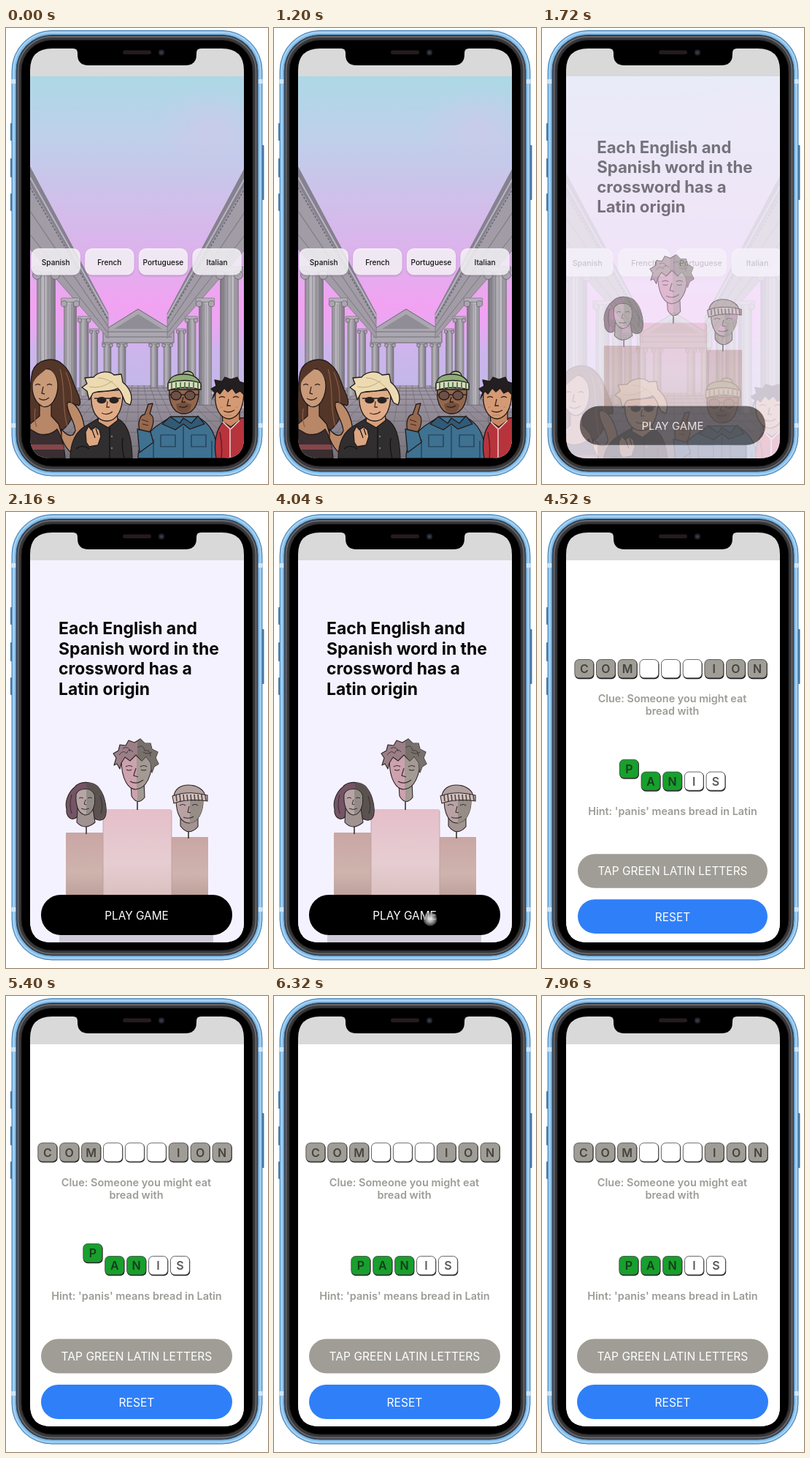
Write an HTML page that moves like this. It is 359 px wide and 623 px high and loops after 8000 ms.

```html
<!DOCTYPE html>
<html lang="en">
<head>
<meta charset="utf-8">
<title>Latin word game</title>
<style>
html, body { margin: 0; width: 100%; height: 100%; overflow: hidden; background: #fff; }
svg { display: block; width: 359px; height: 623px; }
text { font-family: Inter, Roboto, sans-serif; }
</style>
</head>
<body>
<svg id="stage" viewBox="0 0 359 623" xmlns="http://www.w3.org/2000/svg"></svg>
<script>
const LOOP = 8000;
const stage = document.getElementById('stage');

// Markup helpers
const rect = (x, y, w, h, r, fill, more = '') =>
  `<rect x="${x}" y="${y}" width="${w}" height="${h}" rx="${r}" fill="${fill}" ${more}/>`;
const path = (d, fill, more = '') => `<path d="${d}" fill="${fill}" ${more}/>`;
const line = (d, color, w = 1, more = '') =>
  `<path d="${d}" fill="none" stroke="${color}" stroke-width="${w}" ${more}/>`;
const oval = (x, y, rx, ry, fill, more = '') =>
  `<ellipse cx="${x}" cy="${y}" rx="${rx}" ry="${ry}" fill="${fill}" ${more}/>`;
const text = (s, x, y, size, fill, weight = 400, anchor = 'middle') =>
  `<text x="${x}" y="${y}" font-size="${size}" fill="${fill}" font-weight="${weight}" text-anchor="${anchor}">${s}</text>`;
const gradient = (id, ...stops) =>
  `<linearGradient id="${id}" x1="0" y1="0" x2="0" y2="1">` +
  stops.map(([at, c]) => `<stop offset="${at}" stop-color="${c}"/>`).join('') + '</linearGradient>';

const defs = `<defs>
  <clipPath id="screen"><path d="M33 66H326V560Q326 588 298 588H62Q33 588 33 558Z"/></clipPath>
  ${gradient('sky', [0, '#add8e6'], [.16, '#bed0ea'], [.32, '#cfc0ea'], [.48, '#deb0ec'], [.6, '#f2a2f2'],
    [.65, '#eaa6f1'], [.72, '#ccb5ec'], [.82, '#c2b8e8'])}
  ${gradient('floor', [0, '#a39ba9'], [1, '#77727a'])}
  ${gradient('pink', [0, '#e5bfc9'], [.6, '#e6cdd2'], [1, '#d9bfbd'])}
  ${gradient('tan', [0, '#c9a6a4'], [.6, '#cfb3ad'], [1, '#bb9f98'])}
  <linearGradient id="shaft"><stop offset="0" stop-color="#8b8890"/><stop offset=".35" stop-color="#c0bdc4"/>
    <stop offset="1" stop-color="#77737c"/></linearGradient>
  <linearGradient id="split"><stop offset=".5" stop-color="#cda2ae"/><stop offset=".5" stop-color="#a39a94"/></linearGradient>
  <radialGradient id="tap"><stop offset="0" stop-color="#fff"/><stop offset=".5" stop-color="#b5b5b5"/>
    <stop offset="1" stop-color="#777" stop-opacity=".55"/></radialGradient>
  <radialGradient id="cloud"><stop offset="0" stop-color="#dcc2ea"/><stop offset="1" stop-color="#dcc2ea" stop-opacity="0"/></radialGradient>
  <filter id="soft"><feGaussianBlur stdDeviation="1.2"/></filter>
</defs>`;

// Temple
function column(cx, w, top, foot) {
  const x = cx - w / 2, c = w * .24;
  let s = rect(x, top + c, w, foot - top - c, 0, 'url(#shaft)', 'stroke="#68646c" stroke-width=".5"');
  for (let i = 1; i < 5; i++) s += line(`M${x + w * i / 5} ${top + c * 2}V${foot}`, '#7d7983', w / 36);
  s += rect(x - c, top, w + c * 2, c * 1.3, 1, '#b5b1b9', 'stroke="#68646c" stroke-width=".6"');
  for (const k of [-1, 1])
    s += oval(cx + k * w / 2, top + c * 1.9, c, c, '#aaa6ae', 'stroke="#5b5760" stroke-width=".7"');
  return s;
}

const colonnade =
  path('M33 190L140 390V424L33 302Z', '#a19ca6', 'stroke="#7b7681" stroke-width=".8"') +
  path('M33 190L140 390V398L33 214Z', '#85818f') +
  line('M33 204L140 394', '#b9b5c0', 2) +
  line('M33 218L140 399', '#6b6773', 1.6, 'stroke-dasharray="3 2"') +
  line('M33 250L140 408', '#817c86', 1.2) + line('M33 282L140 417', '#7a7580', 1) +
  [[121, 9, 411, 496], [107, 12, 394, 503], [88, 17, 369, 515], [55, 25, 326, 540]]
    .map(c => column(...c)).join('');

function floor() {
  let s = path('M33 520L110 488H252L326 520V588H33Z', 'url(#floor)');
  for (let y = 492, k = 4; y < 588; y += k, k *= 1.25) s += line(`M33 ${y}H326`, '#69656e', .8);
  for (let i = -9; i < 10; i++) s += line(`M${181 + i * 8} 488L${181 + i * 25} 588`, '#6e6973', .7);
  return s;
}

const temple = rect(30, 66, 300, 522, 0, 'url(#sky)') +
  oval(280, 135, 80, 55, 'url(#cloud)', 'opacity=".4"') + floor() +
  [139, 159, 203, 221].map(x => column(x, 10, 429, 491)).join('') +
  path('M133 414L181 384L230 414V430H133Z', '#aba7b0', 'stroke="#6a6670"') +
  path('M148 411L181 391L214 411Z', '#918d97') +
  line('M133 415H230M136 422H227', '#726e78') +
  colonnade + `<g transform="translate(361 0) scale(-1 1)">${colonnade}</g>`;

// People in front of the temple
const ink = 'stroke="#211a1a" stroke-width="1.3" stroke-linejoin="round"';

const woman =
  path('M35 565C33 530 30 500 36 470C42 452 66 448 78 460C88 468 90 480 96 494C104 510 103 520 96 514C93 530 84 550 70 552Z', '#543629', ink) +
  path('M46 510V530L33 541V560H78L72 541L62 530V508Z', '#b88767', ink) +
  path('M33 588V548L40 552C48 558 62 556 70 548C78 560 80 574 81 588Z', '#3a2e30', ink) +
  path('M33 569H78L80 576H33Z', '#84464a') +
  path('M76 548C84 558 92 560 95 550C94 536 82 524 84 512C92 508 102 522 106 538C110 554 106 580 94 582C86 580 80 570 76 560Z', '#bd8a68', ink) +
  path('M36 486C37 470 48 464 59 466C69 470 73 484 70 498C67 512 58 520 50 517C40 512 35 500 36 486Z', '#c99a78', ink) +
  path('M36 490C38 476 50 472 58 463C66 472 72 478 73 492C80 474 72 456 56 457C42 458 34 474 36 490Z', '#543629') +
  line('M40 488q4 -3 7 0M56 488q4 -3 7 0M51 490l-2 9 4 1M45 506q7 5 14 -1', '#3b2724', 1.3) +
  line('M74 466C82 490 76 520 84 544M82 470C90 490 90 500 90 514M40 520Q38 535 42 545', '#8a5c42', 1.2);

const blond =
  path('M88 588C88 565 96 550 112 542L127 533H152C166 540 172 555 173 588Z', '#302e2f', ink) +
  path('M128 526L126 538L140 546L153 536L152 524Z', '#d79f7a', ink) +
  path('M117 498C115 525 126 537 138 537C152 537 161 522 160 494Z', '#e0ac87', ink) +
  path('M114 508L111 496L104 491L111 486L108 478L120 477C128 468 142 468 148 474L158 473L160 484C170 492 175 504 170 515L164 512C160 506 160 498 153 492C140 499 126 494 119 499Z', '#ecdbb2', ink) +
  line('M114 490Q130 494 146 482M126 478Q140 478 152 490', '#c2a878') +
  line('M121 506H157', '#222', 1.5) + oval(131, 508.5, 6.5, 4.5, '#272323') + oval(148, 508.5, 6.5, 4.5, '#272323') +
  line('M139 510l-1 8 4 0M131 526q8 4 15 -2', '#4b2b20', 1.3) +
  path('M110 566L109 552L113 544L117 549L123 545L128 549L130 558L126 570L114 572Z', '#dba680', ink) +
  line('M118 549L122 560M123 547L126 556M142 546V588M96 575Q104 568 114 575M160 560Q158 575 162 588', '#111', 1.2) +
  oval(145, 558, 1.2, 1.2, '#807878') + oval(145, 574, 1.2, 1.2, '#807878');

let stripes = '';
for (let x = 227; x < 266; x += 6) stripes += `M${x} 484V493`;
const beanie =
  path('M181 588C180 575 190 556 206 544L226 531H262C280 540 289 555 291 588Z', '#3f7191', ink) +
  path('M224 494C222 515 232 527 243 527C256 527 265 515 264 494Z', '#93674c', ink) +
  path('M233 514Q243 509 254 514Q253 526 243 526Q234 525 233 514Z', '#73503f') +
  oval(249, 475, 8, 6, '#a8c48f', ink) +
  path('M222 490C222 476 232 473 244 473C258 473 267 480 267 491Z', '#8dad78', ink) +
  path('M222 485Q244 478 267 485V494Q244 488 222 495Z', '#d5dbbd', ink) + line(stripes, '#5f7e52', 2) +
  line('M224 501H264', '#2b211c', 1.3) +
  oval(233, 502, 7, 6, '#6d5148', ink) + oval(252, 502, 7, 6, '#6d5148', ink) +
  line('M243 504l-2 7 5 0M237 517q7 3 12 -1', '#2c1b16', 1.3) +
  path('M225 531L238 540L243 533L254 540L263 530L272 541L252 548L243 541L232 549L214 541Z', '#315a76', ink) +
  line('M243 544V588M212 556H232V572H212ZM254 556H274V572H254ZM202 562V588M282 564V588', '#1d3a50', 1.2) +
  path('M183 550C180 538 184 528 190 528L195 514L201 513L197 527C205 531 202 545 196 553Z', '#96684e', ink) +
  line('M186 535L195 538M187 541L195 543', '#3b231b') +
  path('M180 548L198 552L202 566L183 580Z', '#3f7191', ink);

const curly =
  path('M288 588C284 566 288 546 300 536L328 532V588Z', '#b7343c', ink) +
  path('M296 526L297 538L308 545L320 536V522Z', '#c98862', ink) +
  line('M297 538L307 548V588M320 536L308 548', '#e6d5d4', 1.5) + line('M293 552Q297 570 295 588', '#5e1c24', 1.4) +
  path('M287 498C285 520 294 534 306 534C318 532 326 520 326 494C314 484 296 484 287 498Z', '#d49a74', ink) +
  path('M283 506L286 498L281 493L288 489L286 481L296 483L300 477L308 480L317 477L320 483L328 486V503L321 496L315 499L310 492L304 497L299 492L293 500L289 496Z', '#231e20', ink) +
  line('M292 505q4 -3 8 0M311 505q4 -3 8 0M305 507l-2 9 5 0M298 523q8 4 15 -1', '#3a2018', 1.3) +
  line('M294 518h3M315 518h3M300 529h10', '#8e5f47', 1, 'stroke-dasharray="1 1.5"');

const pills = ['Spanish', 'French', 'Portuguese', 'Italian'].map((s, i) => {
  const x = 34.5 + i * 73.6;
  return rect(x, 302.5, 67.5, 36.5, 10, '#75608a', 'opacity=".35" filter="url(#soft)"') +
    rect(x, 301, 67.5, 36.5, 10, '#fff', 'opacity=".78"') + text(s, x + 33.7, 323.6, 10.1, '#111', 450);
}).join('');

// Busts on podiums
const edge = 'stroke="#2c2528" stroke-width="1.1" stroke-linejoin="round"';
const leftBust =
  line('M110 428V440', '#333', 1.6) +
  path('M94 376C102 366 122 368 128 378C136 388 140 410 135 418C130 424 122 420 118 416H98C90 424 82 416 83 406C80 396 86 382 94 376Z', '#755465', edge) +
  path('M110 370C122 368 130 376 133 388C140 406 136 420 128 420L118 416Z', '#59524f') +
  path('M98 405L97 424Q108 436 122 424L119 405Z', '#9f9290', edge) +
  path('M96 386C98 377 116 375 121 386C124 404 116 414 108 414C99 412 95 400 96 386Z', '#b7a5a6', edge) +
  path('M110 379C118 379 122 386 121 396C119 408 114 413 110 413Z', '#928b85') +
  line('M100 391q3 -2 6 0M112 391q3 -2 6 0M109 393l-2 6 3 1M103 405q5 3 11 0M90 386Q86 400 90 412M129 388Q134 402 130 412', '#372b31');
const midBust =
  line('M180 396V407', '#333', 1.6) +
  path('M171 372L172 388Q180 402 190 390L189 368Z', 'url(#split)', edge) +
  path('M158 338C158 366 168 379 178 379C192 378 201 360 200 334C186 322 166 324 158 338Z', 'url(#split)', edge) +
  path('M156 351L152 344L148 346L151 336L147 330L154 326L156 318L164 319L168 312L176 315L184 310L190 316L198 316L200 324L208 328L205 336L209 344L203 348L200 356L198 342L192 334L186 340L178 332L170 340L163 335L158 343Z', '#9b7f87', edge) +
  path('M180 314L184 310L190 316L198 316L200 324L208 328L205 336L209 344L203 348L200 356L198 342L192 334L186 340L180 333Z', '#77706b') +
  line('M155 332q6 -8 10 -2q4 -9 9 -2M160 323q8 -4 10 4M180 322q8 -6 10 4q8 -2 8 8M188 328q6 4 12 0', '#463a40') +
  line('M164 348q5 -3 9 0M184 348q5 -3 9 0M165 352q4 2 7 0M185 352q4 2 7 0M178 350l-3 10 6 2M170 368q9 5 18 -2', '#3a2a30', 1.2);
let knit = '';
for (let x = 233; x < 274; x += 5) knit += `M${x} 386l1 9`;
const rightBust =
  line('M250 434V446', '#333', 1.6) +
  path('M239 415V429Q250 444 263 430V412Z', '#a39491', edge) +
  path('M233 392C233 416 242 425 251 425C262 424 271 412 270 390Z', '#b9a2a4', edge) +
  path('M252 392H270C271 412 262 424 252 425Z', '#968d87') +
  path('M230 390C230 378 240 373 250 373C262 373 273 380 273 390Z', '#b3a19f', edge) +
  path('M228 388Q250 380 276 387V395Q250 391 230 398Z', '#d2c2bd', edge) + line(knit, '#4c4143', 1.6) +
  line('M238 401q4 -3 8 0M255 401q4 -3 8 0M251 402l-2 8 4 1M243 417q8 3 14 -1', '#382b30', 1.1);

const podiums =
  rect(82, 438, 51, 90, 1, 'url(#tan)') + rect(227, 444, 50, 84, 1, 'url(#tan)') +
  rect(133, 406, 94, 122, 2, 'url(#pink)') + line('M133 408V523M227 408V523', '#b99ca0', .8) +
  rect(73, 572, 211, 30, 0, '#cfcad8');

const label = (s, y, size = 15.6) => text(s, 179, y, size, '#fff');
const intro = rect(-60, -60, 480, 760, 0, '#f5f2ff') +
  ['Each English and', 'Spanish word in the', 'crossword has a', 'Latin origin']
    .map((s, i) => text(s, 72, 167 + i * 27.7, 22.9, '#060606', 650, 'start')).join('') +
  podiums + leftBust + midBust + rightBust +
  rect(48, 523, 262, 55, 27, '#000') + label('PLAY GAME', 556.5, 15.4) +
  '<circle id="dot" cx="214" cy="556" r="9.5" fill="url(#tap)" opacity=".9"/>';

// Letter tiles
const styles = {
  gray: ['#9f9d96', '#45443f'],
  green: ['#189f2d', '#173d1b'],
  white: ['#fff', '#5a5a5a']
};
function tile(ch, cx, cy, kind) {
  const [fill, color] = styles[kind];
  return rect(cx - 12.8, cy - 12.2, 26.6, 26, 6, '#1c1c1c') +
    rect(cx - 13, cy - 13, 26, 25.4, 6, fill, 'stroke="#444" stroke-width=".8"') +
    text(ch, cx, cy + 5.8, 16, color, 600);
}
const topRow = [...'COM   ION'].map((c, i) =>
  tile(c, 56.8 + i * 29.9, 213.8, c === ' ' ? 'white' : 'gray')).join('');
const rootRow = [...'PANIS'].map((c, i) => {
  const s = tile(c, 118.8 + i * 29.9, 368.5, i < 3 ? 'green' : 'white');
  return i ? s : `<g id="first">${s}</g>`;
}).join('');

const puzzle = rect(-60, -60, 480, 760, 0, '#fff') + topRow +
  text('Clue: Someone you might eat', 178.5, 260, 14.5, '#9d9c96', 600) +
  text('bread with', 178.5, 277, 14.5, '#9d9c96', 600) + rootRow +
  text("Hint: 'panis' means bread in Latin", 179, 415, 14.5, '#9d9c96', 600) +
  rect(48, 468.5, 262, 47, 23.5, '#9f9d96') + label('TAP GREEN LATIN LETTERS', 498) +
  rect(48, 531, 262, 47, 23.5, '#2f80f8') + label('RESET', 560.5);

// Phone body
const bands = [73, 543].map(y => rect(7.5, y - 3, 6, 6, 0, '#cfe6f7') + rect(345.5, y - 3, 6, 6, 0, '#cfe6f7')).join('');
const ring = (inset, fill, more = '') =>
  rect(8 + inset, 3.5 + inset, 343 - inset * 2, 608.5 - inset * 2, 55 - inset, fill, more);
const phone =
  [[130, 24], [178, 26], [226, 24]].map(([y, h]) => rect(6, y, 4, h, 1, '#3f729f')).join('') +
  rect(349.5, 160, 4, 75, 1, '#3f729f') +
  ring(0, '#82bce8', 'stroke="#4a80b0"') + ring(2.5, 'none', 'stroke="#a9d3f3" stroke-width="2"') + bands +
  ring(6, '#2f3238', 'stroke="#35597a"') + ring(8.5, '#38383b', 'stroke="#68686c" stroke-width="2"') +
  ring(13, '#000', 'stroke="#1e1e20"');
const header =
  path('M33 66V58Q33 28 63 28H92Q98 28 98 34V36Q98 51 113 51H246Q261 51 261 36V34Q261 28 267 28H296Q326 28 326 58V66Z', '#d9d9d9') +
  rect(160, 30.5, 39, 5.5, 2.7, '#251b1d') +
  oval(213, 33.5, 4, 4, '#23232a') + oval(213, 33.5, 1.8, 1.8, '#3c4058');

stage.innerHTML = defs + phone + header + `<g clip-path="url(#screen)">
  ${rect(30, 66, 300, 525, 0, '#f7eef6')}
  <g id="home">${temple}${woman}${blond}${beanie}${curly}${pills}</g>
  <g id="intro">${intro}</g><g id="puzzle">${puzzle}</g></g>`;

const get = id => document.getElementById(id);
const home = get('home'), introPage = get('intro'), puzzlePage = get('puzzle');
const dot = get('dot'), first = get('first');
const clamp = v => Math.max(0, Math.min(1, v));

function place(page, alpha, scale) {
  page.style.display = alpha > 0 ? '' : 'none';
  page.setAttribute('opacity', alpha);
  page.setAttribute('transform', `translate(179 300) scale(${scale}) translate(-179 -300)`);
}

// Page change: the new page grows and fades in while the old one grows and fades out
function change(t, start) {
  const p = clamp((t - start) / 680), q = clamp(p / .58);
  return { move: 1 - (1 - p) ** 3, enter: q ** 1.4, leave: 1 - q };
}

function draw(t) {
  const a = change(t, 1480), b = change(t, 4120);
  const shrunk = c => 1 - .11 * (1 - c.move), grown = c => 1 + .075 * c.move;
  place(home, a.leave, grown(a));
  place(introPage, a.enter * b.leave, shrunk(a) * grown(b));
  place(puzzlePage, b.enter, shrunk(b));
  dot.style.display = t >= 4040 && t < 4240 ? '' : 'none';
  const d = clamp((t - 5840) / 400);
  first.setAttribute('transform', `translate(0 ${-17 * (1 - d * d * (3 - 2 * d))})`);
}

function tick(now) {
  draw(now % LOOP);
  requestAnimationFrame(tick);
}
draw(0);
requestAnimationFrame(tick);
</script>
</body>
</html>
```
